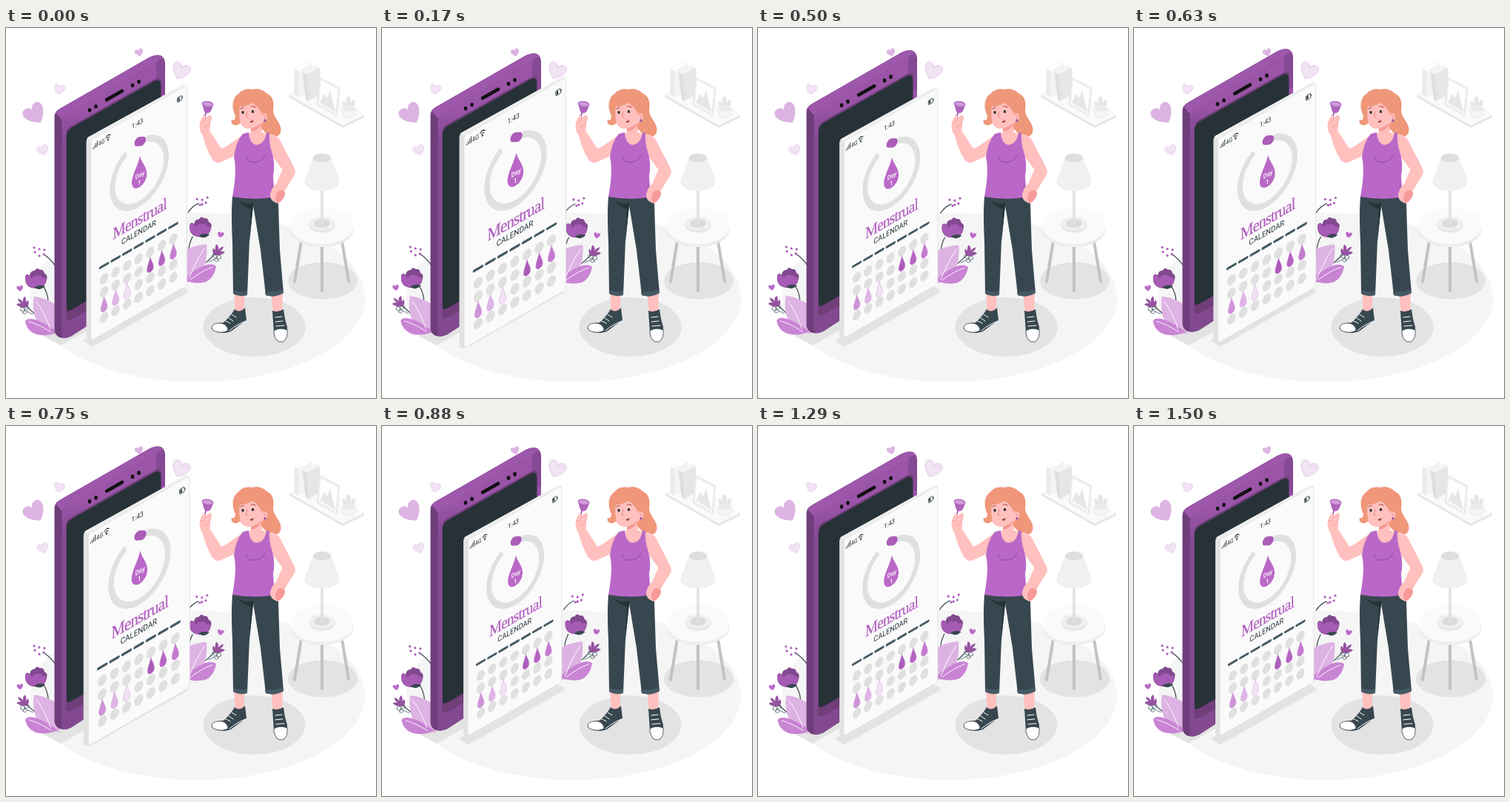
Recreate the animation shown at these times as an HTML page. Size 500x500 px, loop 1.54 s.

```html
<!DOCTYPE html>
<html lang="en">
<head>
<meta charset="utf-8">
<title>Cycle calendar</title>
<style>
html, body { margin: 0; height: 100%; overflow: hidden; background: #fff; }
svg { display: block; width: 100%; height: 100%; }
text { text-anchor: middle; font-family: Roboto, sans-serif; }
.line { fill: none; stroke-linecap: round; stroke-linejoin: round; }
</style>
</head>
<body>
<svg viewBox="0 0 500 500">
<defs>
  <path id="heart" d="M0 10C-14 1-12-9-6-9Q-1-9 0-4Q1-9 6-9C12-9 14 1 0 10Z"/>
  <path id="drop" d="M0-11C1-6 5 0 5 4.500A5 5 0 0 1-5 4.500C-5 0-1-6 0-11Z"/>
  <g id="bloom">
    <path fill="#824990" d="M-1 13C-13 13-17 4-14-5Q-11-7-9-4Q-8-11-2-11Q0-16 5-12Q10-13 11-7Q16-5 14 1C13 9 8 13-1 13Z"/>
    <path fill="#a65bb4" d="M-15-4Q-9-6-6 0Q-3-6 2-4Q7-6 8-1Q14-3 13 3Q11 12 0 13C-12 13-16 4-15-4Z"/>
    <path fill="#37474f" d="M-3 12Q3 7 12 10Q7 15 2 14Z"/>
  </g>
  <path id="bud" fill="#9553a0" d="M7 6C0 9-5 5-8 3Q-4 0-1 2Q-6-2-6-5Q-1-4 1 0Q0-6 4-8Q6-3 5 0L8-3Q10 2 7 6Z"/>
  <path id="sprig" class="line" stroke="#455a64" stroke-width=".8" d="M-7 1C-9-4-3-5-2 0Q-2 4-7 1ZM-2 0C-1-7 6-5 4-2Q2 1-2 0ZM-4 4C-3 0 2 1 1 4Q-1 7-4 4ZM1 2L9 6"/>
  <linearGradient id="bezel" x2="0" y2="1"><stop offset=".18" stop-color="#9a54a8"/><stop offset=".3" stop-color="#824990"/></linearGradient>
</defs>

<ellipse cx="259" cy="364" rx="226" ry="114.500" fill="#f5f5f5"/>
<g fill="#e3e3e3">
  <ellipse cx="335.500" cy="404" rx="69" ry="40"/>
  <ellipse cx="428" cy="341.500" rx="47" ry="25"/>
  <path d="M49 416L74 429L124 401L100 387ZM104 422L115 430Q117 431 120 429L246 357V354L237 349Z"/>
</g>

<!-- shelf -->
<g stroke-linejoin="round">
  <path fill="#fafafa" stroke="#f0f0f0" d="M383 91L411 77L484 118L455 132Z"/>
  <path fill="#e6e6e6" d="M383 91L455 132L484 118V121L455 135L383 94Z"/>
  <path fill="#f3f3f3" stroke="#ebebeb" d="M390 55L408 46L413 49V82L395 93L390 90Z"/>
  <path fill="#fff" d="M390 55L408 46L413 49L395 58Z"/>
  <path fill="#ebebeb" d="M390 55L395 58V93L390 90Z"/>
  <path fill="#e6e6e6" d="M401 60L418 51L424 54L426 88L409 99L405 96Z"/>
  <path fill="#f5f5f5" d="M401 60L418 51L424 54L406 63Z"/>
  <path fill="#dedede" d="M401 60L406 63L409 99L405 96Z"/>
  <path fill="#f0f0f0" stroke="#e6e6e6" d="M424 67L451 81L447 119L420 104Z"/>
  <path fill="#fff" d="M426 71L448 83L445 114L423 102Z"/>
  <path fill="#e6e6e6" d="M424 101L430 89L434 95L438 85L445 113Z"/>
  <path fill="#e6e6e6" d="M463 110Q452 105 456 98Q460 99 461 103Q457 95 463 92Q468 96 465 103Q467 97 472 98Q474 105 463 110Z"/>
  <path fill="#f5f5f5" stroke="#ebebeb" d="M454 109V117Q463 126 473 117V109Z"/>
  <ellipse cx="463.500" cy="109" rx="9.500" ry="4" fill="#ebebeb"/>
</g>

<!-- table and lamp -->
<path class="line" stroke="#c2c2c2" stroke-width="4" d="M399 288L390 343M427 294V355M454 288L463 342"/>
<path fill="#ededed" d="M384 267V272A43 24 0 0 0 470 272V267Z"/>
<ellipse cx="427" cy="267" rx="43" ry="25" fill="#fafafa"/>
<ellipse cx="427" cy="266" rx="18" ry="10.500" fill="#e6e6e6"/>
<ellipse cx="427" cy="264" rx="17.500" ry="9.500" fill="#f0f0f0"/>
<ellipse cx="427" cy="264" rx="11" ry="6" fill="#dbdbdb"/>
<path stroke="#e0e0e0" stroke-width="3.500" d="M427 215V264"/>
<path fill="#f0f0f0" d="M415 175L403 207C404 224 450 224 451 207L439 175Z"/>
<ellipse cx="427" cy="175.500" rx="12" ry="6" fill="#dedede"/>

<g id="hearts"></g>

<g id="plants">
  <g class="line" stroke="#37474f" stroke-width="1.200">
    <path d="M51 306Q60 312 67 322M51 350Q56 358 57 368M26 375L42 389M246 249Q252 240 260 237M252 282Q247 292 247 300M270 317L286 302"/>
  </g>
  <path fill="#ddb3e3" d="M38 363C35 383 39 398 54 411L72 414V377Q56 365 38 363Z"/>
  <path fill="#c984d4" d="M26 397C28 389 46 393 70 411Q55 418 40 414Q28 409 26 397Z"/>
  <path class="line" stroke="#fff" stroke-width=".9" d="M41 370Q52 383 60 407M31 397Q43 400 61 411"/>
  <use href="#bloom" x="41" y="339"/>
  <use href="#bud" x="22" y="371"/>
  <use href="#sprig" x="27" y="381"/>
  <path fill="#ddb3e3" d="M271 292C273 315 267 332 250 342L236 346V304Q252 293 271 292Z"/>
  <path fill="#c984d4" d="M284 322C278 315 260 321 240 340Q254 347 270 343Q281 338 284 322Z"/>
  <path class="line" stroke="#fff" stroke-width=".9" d="M268 298Q258 312 247 339M279 323Q266 327 249 340"/>
  <use href="#bloom" x="263" y="269"/>
  <use href="#bud" transform="translate(288 300) scale(-1 1)"/>
  <use href="#sprig" transform="translate(283 310) scale(-1 1)"/>
  <g id="berries" fill="#ab5cb9"></g>
</g>

<g id="phone">
  <path fill="#6f3d7a" d="M65.500 122Q65 114 72 110L194 40Q214 31 215 49V335L88 417Q78 421 71 418Q65.500 414 65.500 408Z"/>
  <path fill="#9d57ab" d="M67 115L72 110L194 40Q208 33 214 43L190 55L80 120L76 125Z"/>
  <path fill="url(#bezel)" d="M75.500 128Q76 122 82 118L199 50Q215 42 215 56V335L88 417Q80 421 75.500 419Z"/>
  <path fill="#854a93" d="M203 48Q208 40 214 43L215 56V90H203Z"/>
  <path fill="#703e78" d="M81 145Q81 137 88 133L202 69Q210 66 210 74V325L89 394Q81 398 81 390Z"/>
  <path fill="#263238" d="M82 147Q82 139 89 135L201 72Q209 69 209 77V312L89 381Q82 385 82 380Z"/>
  <path class="line" stroke="#111" stroke-width="4.600" d="M136 97.500L157 85.500"/>
  <g fill="#111">
    <ellipse cx="113" cy="111.500" rx="2.300" ry="2.800"/><ellipse cx="121.500" cy="106.500" rx="2.300" ry="2.800"/>
    <ellipse cx="171" cy="78" rx="2.300" ry="2.800"/><ellipse cx="179.500" cy="73" rx="2.300" ry="2.800"/>
  </g>
</g>

<g id="panel">
  <path fill="#e2e2e2" d="M110 156Q110 152 113 149.500L237 81Q241 79 243 83V344L118 418Q115 420 112 418L110 416Z"/>
  <path fill="#efefef" d="M111 151L113 149.500L237 81Q241 79 243 83L118 155Z"/>
  <g transform="matrix(.866 -.5 0 1 116 154)">
    <rect width="146.600" height="265" rx="4" fill="#fafafa" stroke="#dcdcdc" stroke-width=".6"/>
    <g fill="#263238">
      <g transform="translate(-2 -2.500)">
        <path d="M5 14h1v2H5zM7.200 12h1v4h-1zM9.400 10h1v6h-1zM11.600 8h1v8h-1z"/>
        <text x="18.500" y="16" font-size="8">4G</text>
        <circle cx="28.500" cy="15" r="1.200"/>
        <path class="line" stroke="#263238" stroke-width="1.100" d="M26.500 12.700Q28.500 10.700 30.500 12.700M25 10.500Q28.500 7 32 10.500"/>
      </g>
      <text x="71" y="16.500" font-size="9">1:43</text>
      <rect x="132" y="10" width="7" height="6" rx="1" fill="none" stroke="#263238" stroke-width=".8"/>
      <path d="M133 11h2.500v4H133zM139.500 12h1v2h-1z"/>
    </g>
    <g transform="translate(74 80)">
      <path class="line" stroke="#e0e0e0" stroke-width="8" style="stroke-linecap:butt" d="M10-39.800A41 41 0 1 1-20-35.800"/>
      <path class="line" stroke="#ab5cb9" stroke-width="11" d="M-2-42.500L4.500-39.500"/>
      <path fill="#ba68c8" d="M1-22C3-12 11.500-3 11.500 7.500A11.500 11.500 0 0 1-11.500 7.500C-11.500-3-1-12 1-22Z"/>
      <g fill="#fff" font-size="8.500" font-weight="500"><text x="1" y="6">Day</text><text y="15.500">1</text></g>
    </g>
    <text x="74.500" y="148" font-size="22" letter-spacing="-.8" fill="#b05fbe" stroke="#b05fbe" stroke-width=".25" style="font-family:'Liberation Serif',serif">Menstrual</text>
    <text x="73" y="161.500" font-size="10.500" fill="#263238">CALENDAR</text>
    <g id="days"></g>
  </g>
</g>

<!-- woman -->
<g id="woman">
  <path fill="#f0977a" d="M313 131C307 133 303 128 305 124Q310 126 310 119C304 107 306 94 314 89Q321 81 332 83Q344 80 352 88C363 93 362 104 361 112C362 122 371 127 371.500 137C372 146 364 150 352 143L330 120Z"/>
  <g fill="#ffc0be">
    <path d="M324 142C312 149 300 160 291 163L274 137L264 139C268 155 274 171 280 179Q285 185 293 180L320 168Z"/>
    <path d="M264 143Q259 130 264 123Q267 117 270 121L276 117Q280 121 276 128Q277 136 273 142Z"/>
    <path d="M354 143Q366 143 371 153L389 188Q393 194 389 200L376 221Q374 233 367 237Q357 234 357 226Q358 217 365 211L374 192L357 169Z"/>
    <path d="M308 355H323L321 384Q315 388 310 383ZM358 357H374L373 385H361Z"/>
    <path d="M316 106Q324 107 331 100Q339 104 346 115Q349 113 353 118Q354 126 348 127L344 130L346 141L358 146Q355 162 340 164Q326 161 322 146L331 141V136Q321 137 317 130Q314 118 316 106Z"/>
  </g>
  <path fill="#f79a98" d="M331 136Q339 134 344 129Q343 138 331 140Z"/>
  <path class="line" stroke="#ef8f8d" stroke-width=".8" d="M264 129Q270 128 270 122M268 134Q275 132 276 126"/>
  <!-- face -->
  <g fill="#263238"><ellipse cx="320" cy="114" rx="1.700" ry="2.100"/><ellipse cx="333.500" cy="113" rx="1.700" ry="2.100"/></g>
  <path class="line" stroke="#a84f3d" stroke-width="1.100" d="M317 109L321 107.500M331 106Q335 105 337 107.500"/>
  <path class="line" stroke="#ed8583" stroke-width="1" d="M326 113L324 120L327 121M348 118Q351 118 350 122"/>
  <path fill="#9e3f44" d="M329 126Q332 126.500 334 124Q335 128 331 128Z"/>
  <circle cx="350" cy="125" r="1.700" fill="#9553a0"/>
  <path fill="#f0977a" d="M310 114Q308 95 321 90Q340 84 352 96Q359 106 352 117Q348 113 346 117Q342 105 333 101Q324 107 316 106Q315 111 312 115Z"/>
  <!-- top -->
  <path fill="#ba68c8" d="M320 143L328 141Q329 156 338 158Q350 157 352 141L356 142Q355 156 360 170Q364 185 361 200L363 229Q337 235 306 228C309 211 312 190 308 175Q310 155 320 143Z"/>
  <path class="line" stroke="#8b4a99" stroke-width="1" d="M324 174Q328 183 336 181Q345 182 350 172"/>
  <!-- trousers -->
  <path fill="#37474f" d="M306 228Q335 233 359 229Q363 237 368 237L370 300L375 358Q363 365 351 361L344 300L334 240L329 288L326 361Q315 363 307 359L306 290Q304 250 306 228Z"/>
  <path fill="#263238" d="M313 233Q326 240 334 236L335 246L334 240L329 288L331 244Q321 242 313 233Z"/>
  <path fill="#455a64" d="M307 354Q317 358 326 355V361Q315 364 307 359ZM350 356Q363 358 374.500 353L375 358Q363 365 351 361Z"/>
  <!-- hand resting on the hip -->
  <path fill="#ffc0be" d="M374 190L390 196L376 221Q374 233 367 237Q357 234 357 226Q358 217 365 211Z"/>
  <path fill="#f79a98" d="M365 225Q370 215 377 222Q378 231 367 237Q363 234 365 225Z"/>
  <!-- shoes -->
  <path fill="#37474f" d="M309 380Q315 386 323 378L325 395Q314 402 304 410Q290 415 278 407Q278 399 294 398Q303 390 309 380ZM360 382Q367 385 375 380Q376 392 380 404Q381 421 374 424Q364 426 362 412Z"/>
  <path fill="#fff" stroke="#37474f" stroke-width=".8" d="M278 404Q280 398 292 399Q300 402 300 409Q289 414 279 408ZM362 409Q370 404 380 408Q381 421 374 424Q364 426 362 412Z"/>
  <path class="line" stroke="#fff" stroke-width="1" d="M302 409Q311 401 324 396M297 396L303 399M301 392L307 396M305 387L311 391M365 403L376 402M364 397L374 396M364 391L373 390"/>
  <!-- cup -->
  <path class="line" stroke="#9553a0" stroke-width="1.800" d="M270 114L268.500 121"/>
  <path fill="#b065be" d="M265.200 102L267 110Q268 115 272 115Q276 115 277.500 111L280 104Z"/>
  <ellipse cx="272.500" cy="103" rx="7.500" ry="3.700" transform="rotate(9 272.500 103)" fill="#cf98d9" stroke="#a65bb4" stroke-width="1"/>
  <path fill="#ffc0be" d="M266 125Q265 117 269 118Q271 123 268 128ZM272 126Q273 117 277 118Q279 122 275 128Z"/>
</g>
</svg>

<script>
const LOOP = 1540;
const el = id => document.getElementById(id);

const heart = (x, y, scale, turn, fill) =>
  `<use href="#heart" transform="translate(${x} ${y}) rotate(${turn}) scale(${scale})" fill="${fill}"
    stroke="#d9b0df" stroke-width=".5"/>`;
const pale = "#f1e2f4", soft = "#ddb3e3";
el("hearts").innerHTML =
  heart(39, 116, 1.35, -34, soft) + heart(72, 83, .68, 12, pale) + heart(180, 33, .52, -18, soft) +
  heart(236, 58, 1.12, 22, pale) + heart(50, 165, .7, -22, pale);
el("plants").innerHTML += heart(19, 352, .4, -12, "#ba68c8") + heart(290, 279, .4, 12, "#ba68c8");

el("berries").innerHTML =
  [[38, 297], [45, 299], [39, 303], [52, 300], [45, 308], [51, 306],
   [258, 231], [265, 232], [272, 229], [262, 239], [270, 236], [265, 238]]
  .map(([x, y]) => `<circle cx="${x}" cy="${y}" r="1.600"/>`).join("");

// Calendar cells: dashes above, dots below, drops on marked days
const marks = { 14: "#ce93d8", 15: "#dfb6e6", 16: "#f1e2f4", 11: "#ab5cb9", 12: "#b565c3", 13: "#c47bd0" };
let days = "";
for (let col = 0; col < 7; col++) {
  const x = 20.2 + 17.6 * col;
  days += `<path class="line" stroke="#455a64" stroke-width="3.400" d="M${x - 6} 175.500h12"/>`;
  for (let row = 0; row < 4; row++) {
    const y = 193 + 17 * row, fill = marks[row * 7 + col];
    days += fill
      ? `<use href="#drop" x="${x}" y="${y}" fill="${fill}" stroke="#ce93d8" stroke-width=".4"/>`
      : `<circle cx="${x}" cy="${y}" r="6.500" fill="#e0e0e0"/>`;
  }
}
el("days").innerHTML = days;

// Linear interpolation through [time, value] keys
function track(t, keys) {
  const i = keys.findIndex(key => key[0] > t);
  const [t0, v0] = keys[i - 1], [t1, v1] = keys[i];
  return v0 + (v1 - v0) * (t - t0) / (t1 - t0);
}
const beat = [[0, 1.022], [120, 1.1], [420, 1], [570, 1], [720, 1.1], [870, 1], [1500, 1], [LOOP, 1.022]];
const lift = [[0, -.4], [720, -10], [1470, 0], [1500, 0], [LOOP, -.4]];
const sway = [[0, .08], [345, 1], [1095, -1], [1470, 0], [LOOP, .08]];

function draw(now) {
  const t = now % LOOP;
  el("panel").setAttribute("transform", `translate(176.500 250) scale(${track(t, beat)}) translate(-176.500 -250)`);
  el("phone").setAttribute("transform", `translate(0 ${track(t, lift)})`);
  el("plants").setAttribute("transform", `rotate(${track(t, sway)} 155 322)`);
  requestAnimationFrame(draw);
}
draw(performance.now());
</script>
</body>
</html>
```
